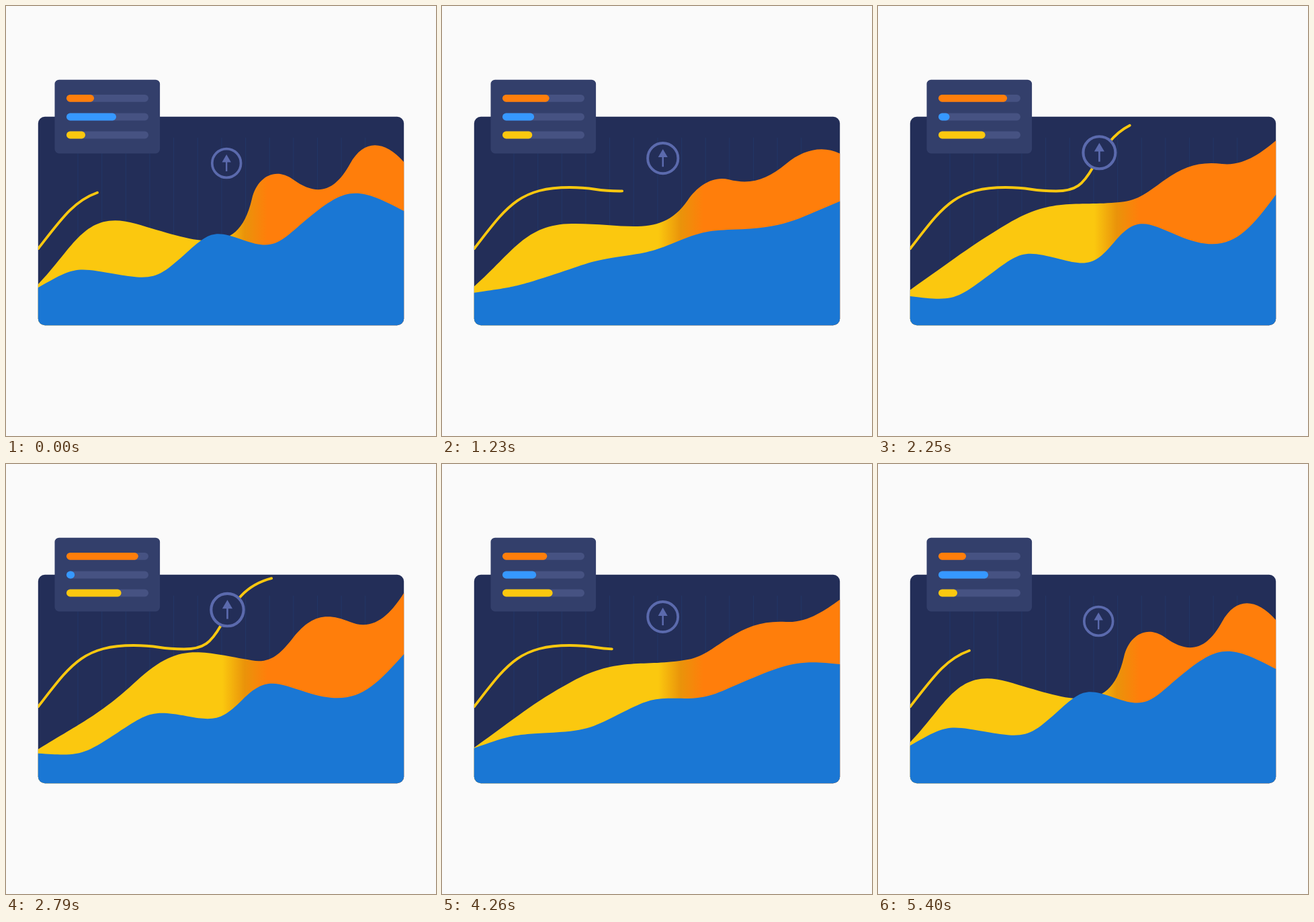
An HTML page with a canvas for the animation above (5430 ms loop, 640 by 640 pixels).

```html
<!DOCTYPE html>
<html lang="en">
<head>
<meta charset="utf-8">
<title>Area chart</title>
<style>
html, body { margin: 0; width: 100%; height: 100%; overflow: hidden; background: #fafafa; }
canvas { display: block; width: 640px; height: 640px; }
</style>
</head>
<body>
<canvas id="stage"></canvas>
<script>
const LOOP = 5430, CYCLE = 5400, STEP = 30;
const YELLOW = '#fbc80f', ORANGE = '#ff7e0b', BLUE = '#1a77d4';
const PAGE = '#fafafa', PANEL = '#232e58', RING = '#5b6aad';
const L = 47.8, R = 592.2, TOP = 164.8, BOTTOM = 475.3;
const REACH = .54; // handle length as a share of the gap between knots

const canvas = document.getElementById('stage');
const ctx = canvas.getContext('2d');
const ratio = window.devicePixelRatio || 1;
canvas.width = canvas.height = 640 * ratio;

// Each knot: x, y at rest, y at peak, handle angle at rest, handle angle at peak
const front = [
  [48, 419, 432, -30, 7],
  [166, 399.5, 400, 10, -37],
  [270, 366, 376.5, -42, 15],
  [352, 348, 351, 20, -50],
  [447, 318, 342, -40, 23],
  [592, 305, 281, 28, -54]
];
const back = [
  [48, 414, 426, -46, -30],
  [193, 324, 324, 16, -49],
  [366, 287, 293, -77, 17],
  [427, 258, 259, 36, -59],
  [512, 235, 235, -61, 30],
  [592, 232, 187, 48, -65]
];
const trend = [
  [48, 361, 361, -52, -52],
  [190, 270, 270, 0, 0],
  [265, 275.5, 275.5, 0, 0],
  [320, 240, 240, -60, -60],
  [396, 170, 170, -14, -14]
];

const mix = (a, b, p) => a + (b - a) * p;

// Smooth rise to the peak time, then smooth return
function swing(t, peak) {
  const u = t < peak ? t / peak : (CYCLE - t) / (CYCLE - peak);
  return u * u * (3 - 2 * u);
}

// Smooth chain through the knots; the handle ends blend in a straight line
function curve(knots, p) {
  const pose = knots.map(([x, y0, y1, a0, a1]) => {
    const r0 = a0 * Math.PI / 180, r1 = a1 * Math.PI / 180;
    return {
      x, y: mix(y0, y1, p),
      hx: REACH * mix(Math.cos(r0), Math.cos(r1), p),
      hy: REACH * mix(Math.sin(r0), Math.sin(r1), p)
    };
  });
  let d = `M${pose[0].x} ${pose[0].y}`;
  for (let i = 1; i < pose.length; i++) {
    const a = pose[i - 1], b = pose[i], gap = b.x - a.x;
    d += `C${a.x + a.hx * gap} ${a.y + a.hy * gap} ${b.x - b.hx * gap} ${b.y - b.hy * gap} ${b.x} ${b.y}`;
  }
  return d;
}

const trendShape = curve(trend, 0);
const trendPath = new Path2D(trendShape);
const ruler = document.createElementNS('http://www.w3.org/2000/svg', 'path');
ruler.setAttribute('d', trendShape);
const trendLength = ruler.getTotalLength();

const blend = ctx.createLinearGradient(322, 0, 389, 0);
blend.addColorStop(0, YELLOW);
blend.addColorStop(.5, '#ea930a');
blend.addColorStop(1, ORANGE);

function box(x, y, w, h, r, fill) {
  ctx.beginPath();
  ctx.roundRect(x, y, w, h, r);
  ctx.fillStyle = fill;
  ctx.fill();
}

function drawWave(knots, p, fill) {
  ctx.fillStyle = fill;
  ctx.fill(new Path2D(curve(knots, p) + 'H600V480H40V430Z'));
}

function drawTrend(p) {
  ctx.strokeStyle = YELLOW;
  ctx.lineWidth = 3.8;
  ctx.lineCap = 'round';
  ctx.setLineDash([trendLength * mix(.286, 1, p), 2 * trendLength]);
  ctx.stroke(trendPath);
  ctx.setLineDash([]);
}

function drawBadge(p) {
  ctx.save();
  ctx.translate(mix(328.2, 329.5, p), mix(234, 217, p));
  const s = mix(1, 1.13, p);
  ctx.scale(s, s);
  ctx.beginPath();
  ctx.arc(0, 0, 21.4, 0, 2 * Math.PI);
  ctx.fillStyle = PANEL;
  ctx.fill();
  ctx.strokeStyle = RING;
  ctx.lineWidth = 3.7;
  ctx.stroke();
  ctx.beginPath();
  ctx.moveTo(0, -13);
  ctx.lineTo(6.7, -1.5);
  ctx.lineTo(-6.7, -1.5);
  ctx.fillStyle = RING;
  ctx.fill();
  ctx.fillRect(-1.2, -2, 2.4, 14);
  ctx.restore();
}

function drawBar(y, end, fill) {
  box(90, y, 122, 10.8, 5.4, '#465282');
  box(90, y, end - 90, 10.8, 5.4, fill);
}

function draw(t) {
  const p = swing(t, 2700);
  ctx.setTransform(ratio, 0, 0, ratio, 0, 0);
  ctx.fillStyle = PAGE;
  ctx.fillRect(0, 0, 640, 640);

  ctx.save();
  ctx.beginPath();
  ctx.roundRect(L, TOP, R - L, BOTTOM - TOP, 10);
  ctx.clip();
  ctx.fillStyle = PANEL;
  ctx.fillRect(40, 160, 560, 320);
  ctx.fillStyle = '#233665';
  for (let i = 0; i < 13; i++) ctx.fillRect(106.4 + 35.65 * i, 196, 1.2, 270);
  drawWave(back, swing(t, 3540), blend);
  drawWave(front, swing(t, 2190), BLUE);
  drawTrend(p);
  ctx.restore();

  drawBadge(p);
  box(72.5, 109.7, 156.6, 109.7, 6.5, '#333f6b');
  drawBar(131.9, mix(131, 197, p), ORANGE);
  drawBar(159.6, mix(164, 102, p), '#3698ff');
  drawBar(186.6, mix(118, 181, swing(t, 3690)), YELLOW);
}

const start = performance.now();
function tick(now) {
  const t = Math.max(0, now - start) % LOOP;
  draw(Math.floor(t / STEP) * STEP);
  requestAnimationFrame(tick);
}
draw(0);
requestAnimationFrame(tick);
</script>
</body>
</html>
```
